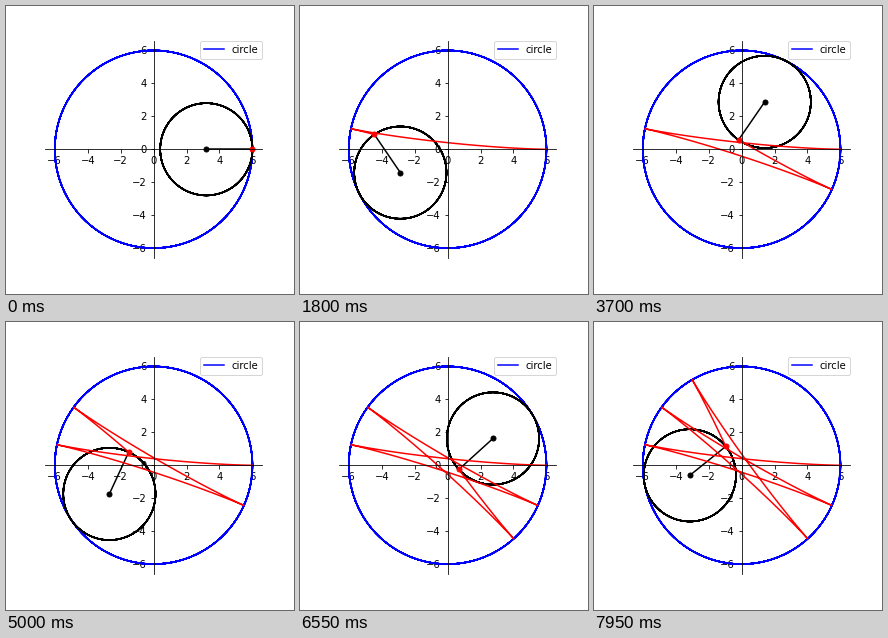
A matplotlib script that plays this animation: 288x288 px, repeating every 8000 ms.

```python
import matplotlib.pyplot as plt
import numpy as np
from matplotlib.animation import FuncAnimation

R, r = 6.0, 2.8          # fixed and rolling circle radii
STEP = 0.1               # angle of the rolling centre per frame
FRAMES, INTERVAL = 160, 50

plt.rcParams.update({
    "font.family": "DejaVu Sans",
    "font.size": 10,
    "figure.subplot.left": 0.125,
    "figure.subplot.right": 0.9,
    "figure.subplot.bottom": 0.125,
    "figure.subplot.top": 0.88,
})


def centre(t):
    return (R - r) * np.cos(t), (R - r) * np.sin(t)


def pen(t):
    cx, cy = centre(t)
    spin = (R - r) / r * t
    return cx + r * np.cos(spin), cy - r * np.sin(spin)


fig, ax = plt.subplots(figsize=(4, 4), dpi=72, facecolor="white")
ax.set_aspect("equal")
ax.set(xlim=(-6.6, 6.6), ylim=(-6.6, 6.6),
       xticks=range(-6, 7, 2), yticks=range(-6, 7, 2))
for side in ("left", "bottom"):
    ax.spines[side].set_position("zero")
for side in ("right", "top"):
    ax.spines[side].set_visible(False)

# Several turns over the same path give the circles their crisp, heavy edge.
turns = np.linspace(0, 14 * np.pi, 1401)
ring_x, ring_y = np.cos(turns), np.sin(turns)

ax.plot(R * ring_x, R * ring_y, "b-", lw=1.5, label="circle")
wheel, = ax.plot([], [], "k-", lw=1.5)
arm, = ax.plot([], [], "k-", lw=1.5)
hub, = ax.plot([], [], "ko", ms=5)
trace, = ax.plot([], [], "r-", lw=1.5)
tip, = ax.plot([], [], "ro", ms=5)
ax.legend(loc="upper right", borderaxespad=0)


def draw(i):
    t = i * STEP
    cx, cy = centre(t)
    px, py = pen(t)
    wheel.set_data(cx + r * ring_x, cy + r * ring_y)
    arm.set_data([cx, px], [cy, py])
    hub.set_data([cx], [cy])
    trace.set_data(*pen(np.arange(i + 1) * STEP))
    tip.set_data([px], [py])
    return wheel, arm, hub, trace, tip


anim = FuncAnimation(fig, draw, frames=FRAMES, interval=INTERVAL,
                     init_func=lambda: draw(0), repeat=True, repeat_delay=0)
plt.show()
```
